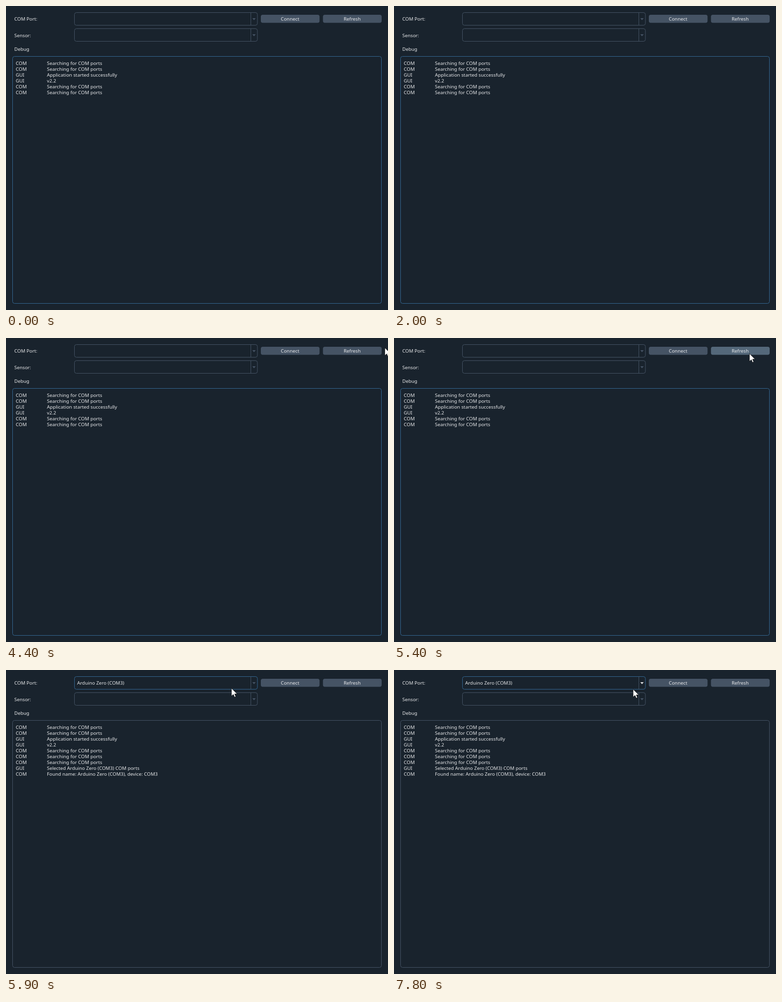
Recreate the animation shown at these times as an HTML page. Size 784x624 px, loop 8 s.

```html
<!DOCTYPE html>
<html lang="en">
<head>
<meta charset="utf-8">
<title>Serial monitor</title>
<style>
  html, body { margin: 0; width: 100%; height: 100%; overflow: hidden; background: #19232d; }
  svg { display: block; }
  text { font: 500 9.8px "Noto Sans", "Open Sans", sans-serif; fill: #e8e9eb; white-space: pre; }
  .frame { fill: none; stroke: #455364; }
  .button { fill: #455364; }
  .arrow { fill: #455364; }
</style>
</head>
<body>
<svg id="stage" width="784" height="624" viewBox="0 0 784 624"></svg>
<script>
const LOOP = 8000, STEP = 100;
const CLICK_REFRESH = 5500, OPEN_PORT = 6400, CLOSE_PORT = 7800;
const COLORS = { line: '#455364', hover: '#54687a', pressed: '#60798b', accent: '#346792', focus: '#1a72bb', text: '#e0e1e3' };

const PORT = 'Arduino Zero (COM3)';
const LOG = [
  ['COM', 'Searching for COM ports'],
  ['COM', 'Searching for COM ports'],
  ['GUI', 'Application started successfully'],
  ['GUI', 'v2.2'],
  ['COM', 'Searching for COM ports'],
  ['COM', 'Searching for COM ports'],
  ['COM', 'Searching for COM ports'],
  ['GUI', `Selected ${PORT} COM ports`],
  ['COM', `Found name: ${PORT}, device: COM3`]
];
const INITIAL_LINES = 6;

// Pointer path: time, x, y
const PATH = [
  [3600, 578, 69], [4000, 690, 46], [4400, 777.5, 20], [4500, 775, 20],
  [4900, 742, 28], [5300, 729.5, 32], [5500, 729.5, 32], [5900, 462.8, 37.5],
  [6200, 484, 32], [6600, 499, 32], [6800, 499, 32], [7100, 490.8, 39.5], [LOOP, 490.8, 39.5]
];

const stage = document.getElementById('stage');

function add(tag, attrs, parent = stage) {
  const node = document.createElementNS('http://www.w3.org/2000/svg', tag);
  for (const name in attrs) node.setAttribute(name, attrs[name]);
  return parent.appendChild(node);
}

function label(x, y, content, parent = stage, anchor = 'start') {
  const node = add('text', { x, y, 'text-anchor': anchor }, parent);
  node.textContent = content;
  return node;
}

function frame(x, y, width, height) {
  return add('rect', { class: 'frame', x, y, width, height, rx: 4 });
}

function combo(y) {
  const border = frame(140.5, y, 375.5, 26);
  add('path', { class: 'frame', d: `M502.5 ${y}v26` });
  const arrow = add('path', { class: 'arrow', d: `M505.5 ${y + 11.5}h7l-3.5 4z` });
  return { border, arrow };
}

function button(x, content) {
  const face = add('rect', { class: 'button', x, y: 18, width: 120.5, height: 16.5, rx: 4 });
  label(x + 60, 30.3, content, stage, 'middle');
  return { face, x };
}

label(17, 30.3, 'COM Port:');
label(17, 63.8, 'Sensor:');
label(17, 92.3, 'Debug');
const port = combo(13.5);
combo(46.5);
const portName = label(146, 30.3, PORT);
const buttons = [button(523, 'Connect'), button(650.5, 'Refresh')];
const logBorder = frame(13.5, 103.5, 757, 507);

const lines = LOG.map(([source, message], i) => {
  const line = add('g', {});
  const y = 120.5 + i * 12.1;
  label(20, y, source, line);
  label(84, y, message, line);
  return line;
});

const pointer = add('path', {
  d: 'M0 0V16L3.8 12.6L6.3 18.2L8.8 17.1L6.4 11.6H11.5Z',
  fill: '#fff', stroke: '#000', 'stroke-width': 0.7
});

function pointerAt(time) {
  const next = PATH.findIndex(key => key[0] > time);
  if (next < 1) return null;
  const [t0, x0, y0] = PATH[next - 1], [t1, x1, y1] = PATH[next];
  const k = (time - t0) / (t1 - t0);
  return { x: x0 + (x1 - x0) * k, y: y0 + (y1 - y0) * k };
}

function inside(p, x, y, width, height) {
  return p && p.x >= x && p.x <= x + width && p.y >= y && p.y <= y + height;
}

function show(node, visible) {
  node.style.display = visible ? '' : 'none';
}

function draw(time) {
  const p = pointerAt(time);
  const refreshed = time >= CLICK_REFRESH;
  const portOpen = time >= OPEN_PORT && time < CLOSE_PORT;

  show(pointer, p);
  if (p) pointer.setAttribute('transform', `translate(${p.x} ${p.y})`);

  for (const { face, x } of buttons) {
    const hovered = inside(p, x, 18, 120.5, 16.5);
    face.style.fill = !hovered ? COLORS.line : time === CLICK_REFRESH ? COLORS.pressed : COLORS.hover;
  }

  const portHovered = inside(p, 140, 13, 376, 27);
  port.border.style.stroke = portOpen ? COLORS.focus : portHovered ? COLORS.accent : COLORS.line;
  port.arrow.style.fill = time >= OPEN_PORT ? COLORS.text : COLORS.line;
  logBorder.style.stroke = refreshed ? COLORS.line : COLORS.accent;

  show(portName, refreshed);
  lines.forEach((line, i) => show(line, refreshed || i < INITIAL_LINES));
}

const start = performance.now();
function tick() {
  const elapsed = (performance.now() - start) % LOOP;
  draw(Math.floor(elapsed / STEP) * STEP);
  requestAnimationFrame(tick);
}
tick();
</script>
</body>
</html>
```
